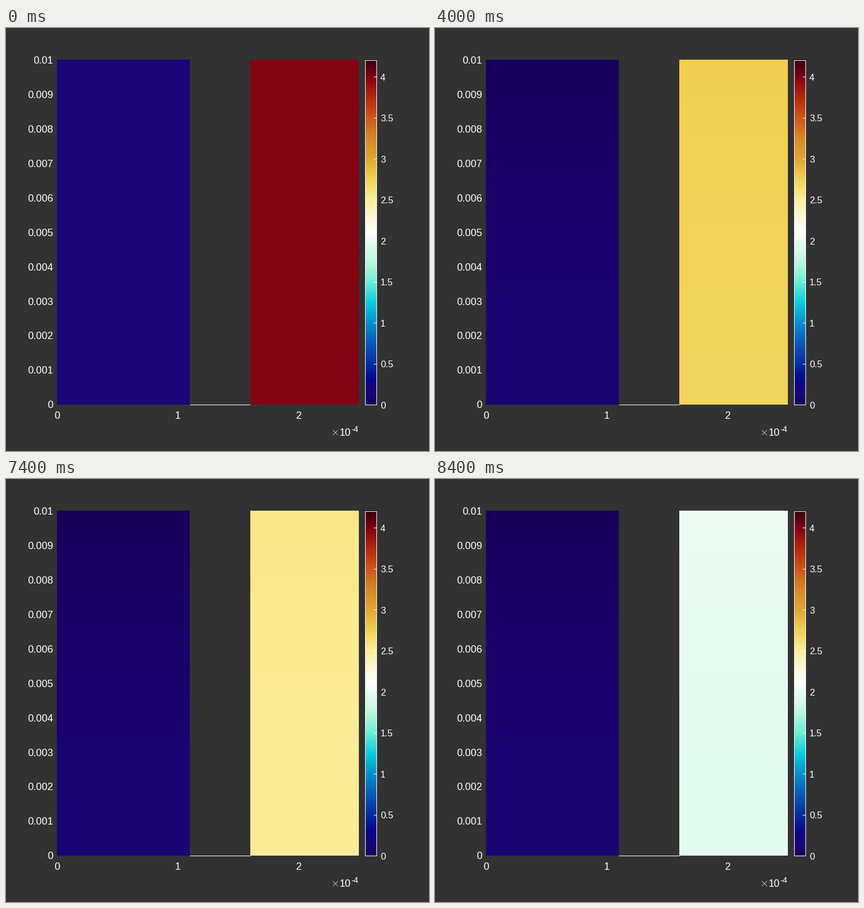
Recreate the animation shown at these times as a matplotlib script. Size 748 px wide and 748 px high, loop 8500 ms.

```python
import numpy as np
import matplotlib.pyplot as plt
from matplotlib.animation import FuncAnimation

SIZE, DPI = 748, 100
TICK_MS, HOLD, TICKS = 100, 5, 85
TOP, BOTTOM = 56, 666
PX_PER_VOLT = 145
V_MAX = 4.2
WHITE = "#ffffff"

# Colour scale: voltage -> RGB
STOPS = [0, 0.13, 0.3, 0.5, 0.75, 1, 1.25, 1.5, 1.75, 2, 2.1,
         2.25, 2.5, 2.75, 3, 3.25, 3.5, 3.75, 3.98, 4.2]
COLOURS = np.array([
    (24, 0, 84), (27, 5, 120), (7, 5, 140), (8, 45, 160), (10, 90, 185),
    (5, 145, 205), (10, 208, 222), (110, 238, 215), (190, 247, 222),
    (235, 252, 243), (255, 255, 255), (252, 248, 220), (251, 238, 155),
    (240, 208, 82), (224, 165, 50), (214, 136, 38), (205, 85, 25),
    (180, 38, 15), (130, 4, 18), (50, 0, 20)]) / 255


def to_rgb(volts):
    """Column of voltages -> image one pixel wide."""
    channels = [np.interp(volts, STOPS, c) for c in COLOURS.T]
    return np.stack(channels, axis=-1)[:, None, :]


plt.rcParams["font.family"] = "Liberation Sans"
fig = plt.figure(figsize=(SIZE / DPI, SIZE / DPI), dpi=DPI, facecolor="#323232")
ax = fig.add_axes([0, 0, 1, 1])
ax.axis("off")


def label(x, y, text, px, ha):
    ax.text(x, y + 0.355 * px, text, fontsize=px * 72 / DPI, color=WHITE,
            ha=ha, va="baseline")


def line(xs, ys, width=1.0, colour=WHITE, snap=True):
    ax.plot(xs, ys, color=colour, lw=width * 72 / DPI, snap=snap,
            solid_capstyle="butt", zorder=3)


def strip(left, right, volts):
    return ax.imshow(to_rgb(volts), extent=(left, right, BOTTOM, TOP),
                     aspect="auto", interpolation="nearest")


# Depth below the tab at the top edge, 0 to 1
depth = (np.arange(BOTTOM - TOP) + 0.5) / (BOTTOM - TOP)
profile = depth * (2 - depth)


def voltages(tick):
    """Anode and cathode potential along the height of the cell."""
    if tick < HOLD:
        return np.full_like(depth, 0.13), np.full_like(depth, 3.98)
    k = tick - HOLD
    start = 0.35 * np.exp(-k / 2)
    base = 2.78 + start - 3.5e-5 * k**2 - 1.2 / (81 - k)
    anode = 0.02 + 0.095 * profile
    cathode = base + 0.05 * (1 - profile)
    return anode, cathode


anode0, cathode0 = voltages(0)
anode_img = strip(90, 325, anode0)
cathode_img = strip(432, 624, cathode0)
strip(635, 656, V_MAX * (1 - depth))

# Axes
line([325, 432], [665.5, 665.5])
for i in range(11):
    label(83.5, 666 - 60.95 * i, f"{i / 1000:g}", 18, "right")
for i in range(3):
    label(90 + 213.6 * i, 684.5, str(i), 18, "center")

# Axis multiplier
line([578, 587], [711, 720], 0.9, "#c8c8c8", False)
line([578, 587], [720, 711], 0.9, "#c8c8c8", False)
label(589.5, 715, "10", 18, "left")
label(610, 708.5, "-4", 14.4, "left")

# Colour bar frame and ticks
line([635.5, 655.5, 655.5, 635.5, 635.5], [56.5, 56.5, 665.5, 665.5, 56.5])
for i in range(9):
    v = i / 2
    y = BOTTOM - PX_PER_VOLT * v
    if v > 0:
        line([650, 655.5], [y, y])
    label(662, y + 0.8, f"{v:g}", 16.4, "left")

ax.set_xlim(0, SIZE)
ax.set_ylim(SIZE, 0)


def update(tick):
    anode, cathode = voltages(tick)
    anode_img.set_data(to_rgb(anode))
    cathode_img.set_data(to_rgb(cathode))
    return anode_img, cathode_img


anim = FuncAnimation(fig, update, frames=TICKS, interval=TICK_MS,
                     repeat=True, repeat_delay=0, blit=False)
plt.show()
```
